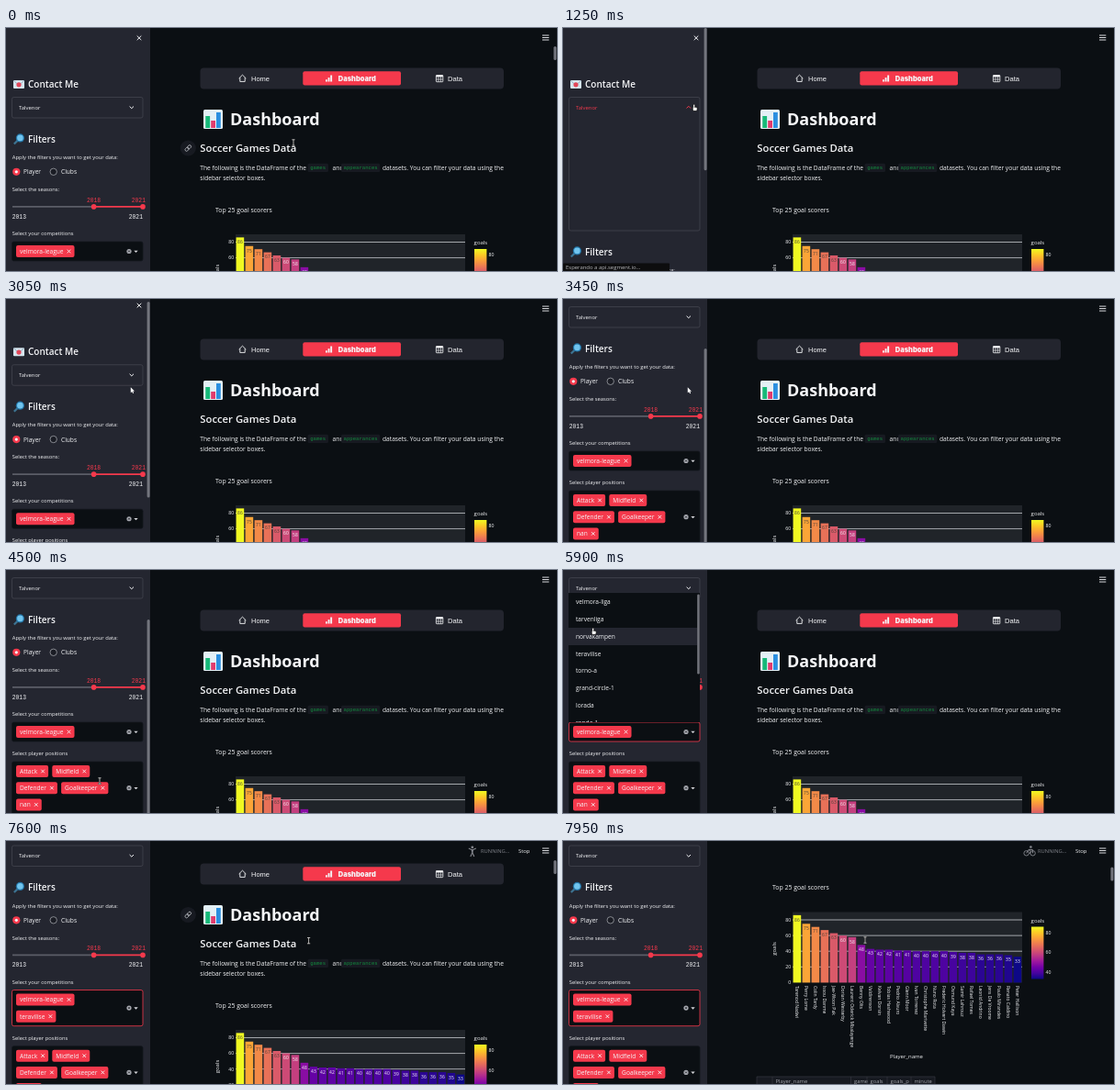
An HTML page with a canvas that plays this animation: 600 px wide and 265 px high, repeating every 8000 ms.

```html
<!DOCTYPE html>
<html lang="en">
<head>
<meta charset="utf-8">
<title>Soccer dashboard</title>
<style>
html, body { margin: 0; width: 100%; height: 100%; overflow: hidden; background: #0b0f13; }
canvas { display: block; width: 600px; height: 265px; }
</style>
</head>
<body>
<canvas id="stage"></canvas>
<script>
const W = 600, H = 265, LOOP = 8000, SIDE = 157;
const canvas = document.getElementById('stage');
const ctx = canvas.getContext('2d');
const dpr = window.devicePixelRatio || 1;
canvas.width = W * dpr;
canvas.height = H * dpr;

const BG = '#0b0f13', PANEL = '#242630', RED = '#f5394c', WHITE = '#f4f5f7', GREY = '#8b8d95';
const SANS = '"Open Sans", "Noto Sans", sans-serif';
const ARIAL = '"Liberation Sans", Arial, sans-serif';
const MONO = '"Liberation Mono", "DejaVu Sans Mono", monospace';

const options = ['velmora-liga', 'tarvenliga', 'norvakampen', 'teravilise', 'torno-a',
  'grand-circle-1', 'lorada', 'ronde-1'];
const positions = [['Attack', 'Midfield'], ['Defender', 'Goalkeeper'], ['nan']];
const goals = [86, 75, 71, 67, 63, 60, 58, 48, 43, 42, 42, 41, 41, 40, 40, 40, 40, 39, 38, 38, 36, 36, 36, 35, 33];
const players = ['Tarenod Nadwi', 'Perry Lome', 'Colin Tardy', 'Issou Danme', 'Jae-Woon Pak',
  'Dorian Westerby', 'Laurent Oderick Mbalayenge', 'Benny Olts', 'Valdirenson', 'Kelvan Dorsin',
  'Tobias Hashwood', 'Pedrio Alvuro', 'Glenn Moor', 'Ivan Torrenez', 'Christophe Marivette',
  'Nuno Rota', 'Frederic Holvert Dawin', 'Osmund Kaya', 'Samir Lahrouz', 'Rafael Tomes',
  'Leonid Andrino', 'Jens De Vroome', 'Paulo Mirandes', 'Renato Caldino', 'Peter Hallison'];
const plasma = ['#0d0887', '#46039f', '#7201a8', '#9c179e', '#bd3786', '#d8576b', '#ed7953', '#fb9f3a', '#fdca26', '#f0f921'];

// Keyframes are [time, value, ...]
const cursorKeys = [[0, 313, 125], [100, 313, 125], [500, 180, 100], [800, 143, 87], [2150, 143, 87],
  [2600, 137, 99], [3450, 137, 99], [4300, 102, 230], [4600, 102, 230], [5100, 100, 176],
  [5400, 100, 176], [5850, 33, 67], [6000, 33, 67], [6350, 33, 91], [6600, 33, 91],
  [7400, 330, 109], [7950, 329, 108]];
const expandKeys = [[850, 0], [950, 70], [1100, 123], [1950, 123], [2050, 50], [2200, 0]];
const sideKeys = [[3000, 0], [3050, 3.5], [3150, 30], [3300, 59], [3400, 67], [6500, 67], [6550, 70.5]];
const pageKeys = [[7520, 0], [7600, 18.5], [7700, 70], [7800, 112], [7950, 147.5]];

function track(keys, t, i = 1) {
  if (t <= keys[0][0]) return keys[0][i];
  for (let k = 1; k < keys.length; k++) {
    const a = keys[k - 1], b = keys[k];
    if (t <= b[0]) return a[i] + (b[i] - a[i]) * (t - a[0]) / (b[0] - a[0]);
  }
  return keys[keys.length - 1][i];
}

// y is the middle of the capitals
function text(s, x, y, size, color = WHITE, { weight = 400, family = SANS, align = 'left' } = {}) {
  ctx.font = `${weight} ${size}px ${family}`;
  ctx.textAlign = align;
  ctx.fillStyle = color;
  ctx.fillText(s, x, y + size * 0.357);
}

function box(x, y, w, h, fill, r = 0, stroke) {
  ctx.beginPath();
  ctx.roundRect(x, y, w, h, r);
  if (fill) { ctx.fillStyle = fill; ctx.fill(); }
  if (stroke) { ctx.strokeStyle = stroke; ctx.lineWidth = 0.8; ctx.stroke(); }
}

function dot(x, y, r, fill) {
  ctx.beginPath();
  ctx.arc(x, y, r, 0, Math.PI * 2);
  ctx.fillStyle = fill;
  ctx.fill();
}

function ring(x, y, r, color, width = 0.9) {
  ctx.beginPath();
  ctx.arc(x, y, r, 0, Math.PI * 2);
  ctx.strokeStyle = color;
  ctx.lineWidth = width;
  ctx.stroke();
}

function line(color, width, ...p) {
  ctx.beginPath();
  ctx.moveTo(p[0], p[1]);
  for (let i = 2; i < p.length; i += 2) ctx.lineTo(p[i], p[i + 1]);
  ctx.strokeStyle = color;
  ctx.lineWidth = width;
  ctx.stroke();
}

function shape(fill, ...p) {
  ctx.beginPath();
  for (let i = 0; i < p.length; i += 2) ctx.lineTo(p[i], p[i + 1]);
  ctx.closePath();
  ctx.fillStyle = fill;
  ctx.fill();
}

function cross(x, y, r, color, width = 0.9) {
  line(color, width, x - r, y - r, x + r, y + r);
  line(color, width, x + r, y - r, x - r, y + r);
}

function rotated(s, x, y, angle, size, align) {
  ctx.save();
  ctx.translate(x, y);
  ctx.rotate(angle);
  text(s, 0, 0, size, WHITE, { align });
  ctx.restore();
}

function tag(label, x, y) {
  ctx.font = `400 6.6px ${SANS}`;
  const w = ctx.measureText(label).width + 16;
  box(x, y - 6.5, w, 13, RED, 2);
  text(label, x + 4, y, 6.6);
  cross(x + w - 6, y, 1.8, WHITE);
  return x + w + 4.2;
}

function multiselect(y, rows, focused) {
  const h = 21 + 18.2 * (rows.length - 1);
  box(6.5, y, 142.5, h, BG, 2, focused ? RED : '#14171e');
  rows.forEach((row, i) => row.reduce((x, label) => tag(label, x, y + 10.5 + 18.2 * i), 11));
  const mid = y + h / 2;
  dot(134, mid, 2.6, '#a5a7ae');
  cross(134, mid, 0.9, BG, 0.7);
  shape('#d5d6da', 139.3, mid - 0.8, 143.7, mid - 0.8, 141.5, mid + 1.6);
}

function mailIcon(y) {
  box(8, y - 4.5, 12, 9, '#d5e5ee', 1);
  line('#7d9db0', 0.7, 8.5, y - 4, 14, y + 1, 19.5, y - 4);
  dot(14, y + 0.3, 2.6, '#e2475a');
}

function lensIcon(y) {
  line('#3d7391', 2.2, 8.8, y + 5, 12.5, y + 1.4);
  dot(15.4, y - 1.6, 4.6, '#2476a8');
  dot(15.4, y - 1.6, 3.3, '#70c4ee');
}

function drawSidebar(t, s) {
  const { open, scroll, picked, menu, cx, cy } = s;
  ctx.save();
  ctx.beginPath();
  ctx.rect(0, 0, SIDE, H);
  ctx.clip();
  box(0, 0, SIDE, H, PANEL);
  ctx.translate(0, -scroll);

  cross(145, 10.8, 2.3, WHITE, 1);
  mailIcon(61.5);
  text('Contact Me', 24, 61, 10, WHITE, { weight: 600 });

  box(6.5, 75.5, 142.5, 22.5 + open, null, 2, '#43454f');
  const tone = s.hover ? RED : WHITE, dir = open > 60 ? -1 : 1;
  text('Talvenor', 14, 86.5, 5.9, tone);
  line(tone, 1, 134.6, 86.5 - dir, 136.8, 86.5 + dir * 1.2, 139, 86.5 - dir);

  ctx.translate(0, open);
  lensIcon(121.5);
  text('Filters', 24, 121.3, 10, WHITE, { weight: 600 });
  text('Apply the filters you want to get your data:', 6.8, 141, 5.82);
  dot(11.3, 156.8, 4.1, RED);
  dot(11.3, 156.8, 1.6, WHITE);
  text('Player', 19, 157, 6.6);
  dot(51.7, 156.8, 3.8, '#1a1c24');
  ring(51.7, 156.8, 3.7, '#a0a2a9', 0.8);
  text('Clubs', 60, 157, 6.6);

  text('Select the seasons:', 6.8, 176, 5.82);
  const mono = { family: MONO };
  text('2018', 88, 187.5, 6.3, RED, mono);
  text('2021', 136.8, 187.5, 6.3, RED, mono);
  box(7, 194, 88, 1.8, '#5b5d67');
  box(95, 194, 54, 1.8, RED);
  dot(95.6, 194.9, 2.8, RED);
  dot(149, 194.9, 2.8, RED);
  text('2013', 6.8, 205.5, 6.3, WHITE, mono);
  text('2021', 133.8, 205.5, 6.3, WHITE, mono);

  text('Select your competitions', 6.8, 224, 5.82);
  const rows = [['velmora-league']];
  if (picked) rows.push(['teravilise']);
  multiselect(233, rows, t > 5150);
  const shift = picked ? 18.2 : 0;
  text('Select player positions', 6.8, 267 + shift, 5.82);
  multiselect(276 + shift, positions, false);
  ctx.restore();

  if (menu) drawMenu(cy);
  if (cx < SIDE && !menu) {
    const k = H / (329 + open + shift);
    box(153.6, scroll * k, 3, H * k, '#73757d', 1.5);
  }
}

function drawMenu(cy) {
  ctx.save();
  ctx.beginPath();
  ctx.rect(6, 25, 143, 141);
  ctx.clip();
  box(6, 25, 143, 141, BG);
  options.forEach((name, i) => {
    const y = 35 + 18.75 * i;
    // the pointing finger reaches a little below its hot spot
    if (Math.abs(cy + 4 - y) < 9.375) box(6, y - 9.4, 140.5, 18.8, PANEL);
    text(name, 14, y, 6.6);
  });
  box(146.2, 26.5, 2.5, 87, '#73757d', 1.2);
  ctx.restore();
}

function drawNav() {
  box(211.5, 43.5, 330.5, 23, '#23252e', 4);
  box(323.3, 47.2, 106.7, 15.2, RED, 2);
  const y = 55;
  line(WHITE, 0.9, 253.6, y, 257.5, y - 3.8, 261.4, y);
  line(WHITE, 0.9, 254.8, y - 0.8, 254.8, y + 3.4, 260.2, y + 3.4, 260.2, y - 0.8);
  text('Home', 267, y, 7.5, WHITE, { family: ARIAL });
  [2.2, 4.4, 7].forEach((h, i) => box(348 + i * 2.6, y + 3.5 - h, 1.9, h, WHITE));
  text('Dashboard', 361.8, y, 7.5, WHITE, { weight: 900, family: 'Inter, sans-serif' });
  box(468.4, y - 3.5, 7.4, 7.2, null, 0.6, WHITE);
  box(468.4, y - 3.5, 7.4, 1.9, WHITE);
  line(WHITE, 0.6, 468.4, y + 1, 475.8, y + 1);
  line(WHITE, 0.6, 470.9, y - 3, 470.9, y + 3.6);
  line(WHITE, 0.6, 473.4, y - 3, 473.4, y + 3.6);
  text('Data', 481, y, 7.6, WHITE, { family: ARIAL });
}

function anchorIcon(y) {
  dot(198.3, y, 8.6, '#171a21');
  ctx.save();
  ctx.translate(198.3, y);
  ctx.rotate(-Math.PI / 4);
  box(-4, -1.6, 4.6, 3.2, null, 1.6, '#b9bbc1');
  box(-0.6, -1.6, 4.6, 3.2, null, 1.6, '#b9bbc1');
  ctx.restore();
}

function heatColor(v) {
  const p = (v - 33) / 53 * 9, i = Math.min(8, Math.floor(p)), f = p - i;
  const part = (c, k) => parseInt(plasma[c].slice(1 + 2 * k, 3 + 2 * k), 16);
  return `rgb(${[0, 1, 2].map(k => Math.round(part(i, k) * (1 - f) + part(i + 1, k) * f))})`;
}

function drawChart() {
  const base = 301.9, unit = 0.855;
  text('Top 25 goal scorers', 228, 198.5, 6.9);
  box(250, 225, 250, base - 225, '#202429');
  for (let v = 0; v <= 80; v += 20) {
    const y = base - v * unit;
    if (v) line('#b4b7bb', 0.9, 250, y, 500, y);
    text(v, 248.3, y, 5.2, WHITE, { align: 'right' });
  }
  goals.forEach((v, i) => {
    const x = 250 + i * 10, top = base - v * unit;
    box(x + 0.6, top, 8.6, v * unit, heatColor(v));
    text(v, x + 4.9, top + 5, 4.9, v > 62 ? '#4a4238' : WHITE, { align: 'center' });
    rotated(players[i], x + 4.6, base + 3.5, Math.PI / 2, 5, 'left');
  });
  rotated('goals', 229.8, 265, -Math.PI / 2, 6, 'center');
  text('Player_name', 374, 382, 6, WHITE, { align: 'center' });

  text('goals', 509.6, 234.3, 6);
  const ramp = ctx.createLinearGradient(0, 298, 0, 241);
  plasma.forEach((c, i) => ramp.addColorStop(i / 9, c));
  box(510, 241, 13.4, 57, ramp);
  [80, 60, 40].forEach((v, i) => text(v, 525.6, 247.5 + i * 21.5, 5.2));
}

function drawTable() {
  box(211, 404.5, 194, 30, '#171a21');
  const cols = [[211, ''], [228, 'Player_name'], [313.5, 'game'], [331, 'goals'], [353, 'goals_p'], [379, 'minute']];
  cols.forEach(([x, name]) => {
    line('#343740', 0.7, x, 404.5, x, 434);
    text(name, x + 3.5, 409.5, 5.8, '#a3a5ac');
  });
  line('#343740', 0.7, 211, 404.5, 405, 404.5, 405, 434);
}

function drawIntro() {
  box(215, 89, 21, 21, '#e3f0f6', 1.5);
  box(217.3, 96, 4.8, 13, '#17b978');
  box(223.2, 101, 4.8, 8, '#e23b6d');
  box(229, 92, 4.8, 17, '#2b8fe0');
  text('Dashboard', 244, 99.7, 18, WHITE, { weight: 700 });
  text('Soccer Games Data', 211.3, 131, 11.3, WHITE, { weight: 600 });
  const y = 152.3, size = 6.66, green = '#128a3e', mono = { family: MONO };
  text('The following is the DataFrame of the', 211.3, y, size);
  box(328.5, y - 4.6, 22.5, 9.4, '#171a21', 1.5);
  text('games', 331.2, y, 5.65, green, mono);
  text('and', 355.6, y, size);
  box(365, y - 4.6, 42.2, 9.4, '#171a21', 1.5);
  text('appearances', 367.5, y, 5.65, green, mono);
  text('datasets. You can filter your data using the', 410, y, size);
  text('sidebar selector boxes.', 211.3, 164, size);
}

function drawRunning(t) {
  const c = '#85878e';
  if (t < 7700) {
    dot(507.8, 6.8, 1.4, c);
    line(c, 1.1, 503.8, 8, 507.8, 10, 511.8, 8);
    line(c, 1.8, 507.8, 9, 507.8, 12.5);
    line(c, 1.1, 505.8, 17, 507.8, 12.5, 509.8, 17);
  } else {
    ring(504.6, 13.3, 2.7, c);
    ring(511.6, 13.3, 2.7, c);
    line(c, 1, 504.6, 13.3, 507, 9.4, 509.3, 11.4, 508.2, 14);
    line(c, 1, 507, 9.4, 511.3, 9.4, 511.6, 13.3);
    dot(509.4, 6.5, 1.3, c);
  }
  text('RUNNING...', 517, 10.5, 5.8, c);
  text('Stop', 558, 10.5, 5.9);
}

function drawMain(t, { page, cx, cy }) {
  ctx.save();
  ctx.beginPath();
  ctx.rect(SIDE, 0, W - SIDE, H);
  ctx.clip();
  ctx.translate(0, -page);
  drawNav();
  drawIntro();
  if (cx > 190 && page < 40) {
    if (cy > 116 && cy < 140) anchorIcon(131);
    else if (cy > 85 && cy <= 116) anchorIcon(99.5);
  }
  drawChart();
  drawTable();
  ctx.restore();

  box(SIDE, 0, W - SIDE, 22, BG);
  for (let i = -1; i < 2; i++) line('#d9dade', 1, 584, 10.5 + i * 2.5, 591.3, 10.5 + i * 2.5);
  if (t > 6900) drawRunning(t);
  if (cx > SIDE) box(596.4, 20 + page * 0.057, 3, 15, '#73757d', 1.5);
}

function drawCursor(t, { cx, cy, hover, menu }) {
  const beam = cx > 190 || (t > 4150 && t < 5420);
  if (beam) {
    for (const [color, w] of [['#000', 1.7], ['#e8e8e8', 0.8]]) {
      line(color, w, cx, cy - 3.2, cx, cy + 3.2);
      line(color, w, cx - 1.6, cy - 3.2, cx + 1.6, cy - 3.2);
      line(color, w, cx - 1.6, cy + 3.2, cx + 1.6, cy + 3.2);
    }
  } else if (hover || menu) {
    box(cx - 1.1, cy - 3.7, 1.7, 5, '#fff', 0.8, '#111');
    box(cx - 1.8, cy - 0.7, 5, 4.2, '#fff', 1.4, '#111');
    box(cx - 0.7, cy - 3.2, 0.9, 4.6, '#fff');
  } else {
    const x = cx - 1.2, y = cy - 2.8;
    shape('#fff', x, y, x, y + 6, x + 1.4, y + 4.8, x + 2.4, y + 6.8, x + 3.3, y + 6.3, x + 2.5, y + 4.4, x + 4.2, y + 4.3);
  }
}

function render(t) {
  ctx.setTransform(dpr, 0, 0, dpr, 0, 0);
  box(0, 0, W, H, BG);
  const s = {
    cx: track(cursorKeys, t), cy: track(cursorKeys, t, 2),
    open: track(expandKeys, t), scroll: track(sideKeys, t), page: track(pageKeys, t),
    picked: t >= 6520, menu: t >= 5250 && t < 6520
  };
  const headY = s.cy + s.scroll;
  s.hover = !s.menu && s.cx > 6 && s.cx < 149 && headY > 75 && headY < 98;
  drawMain(t, s);
  drawSidebar(t, s);
  if (t >= 1100 && t < 1900) {
    box(0, 256.5, 116, 9, '#0d0d0e', 1);
    text('Esperando a api.segment.io...', 3, 261, 5.95, '#b9babd');
  }
  drawCursor(t, s);
}

function frame(now) {
  render(now % LOOP);
  requestAnimationFrame(frame);
}
requestAnimationFrame(frame);
</script>
</body>
</html>
```
